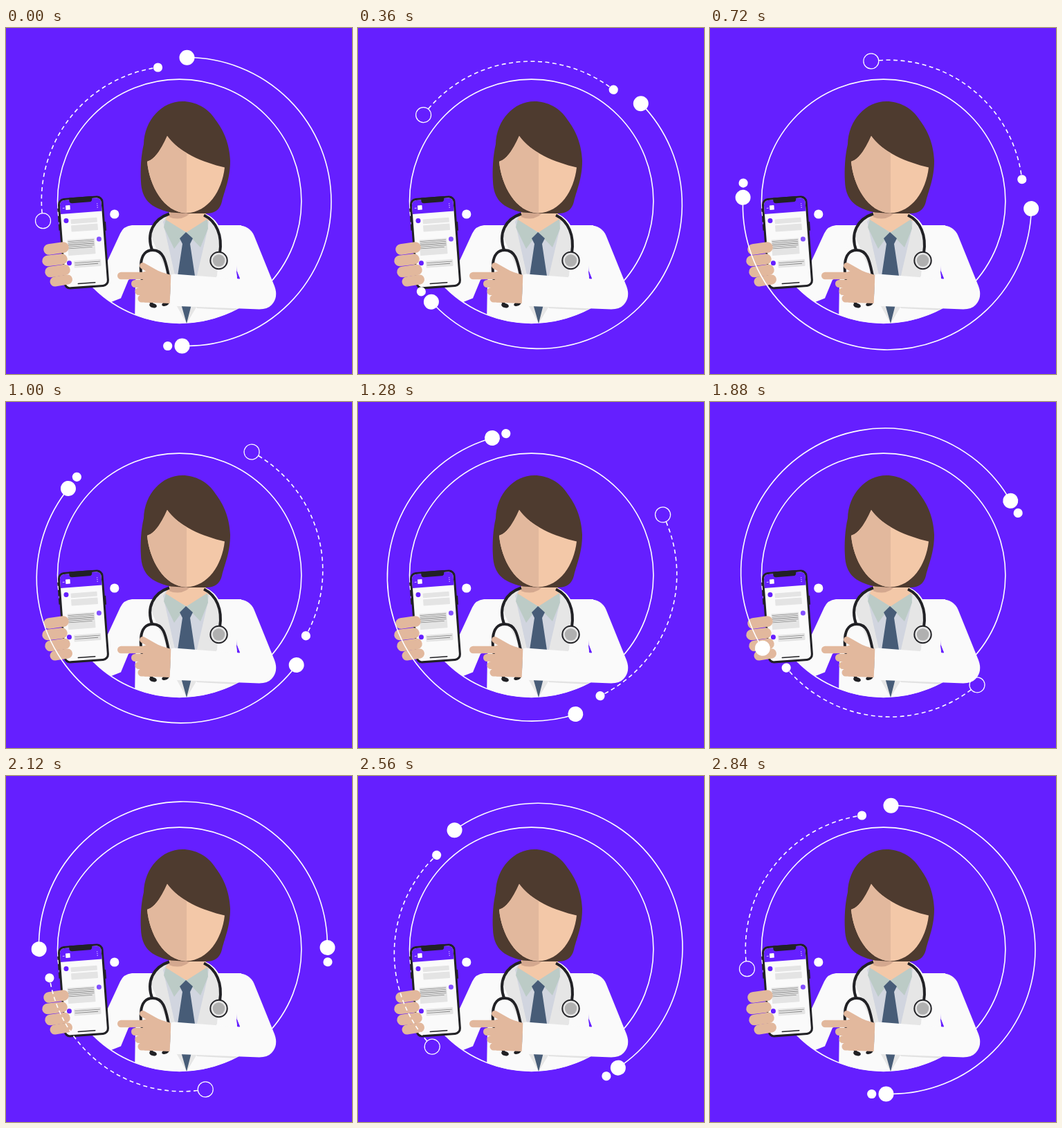
Recreate the animation shown at these times as an HTML page with a canvas. Size 500x500 px, loop 2880 ms.

```html
<!DOCTYPE html>
<html lang="en">
<head>
<meta charset="utf-8">
<title>Doctor with phone</title>
<style>
html, body { margin: 0; width: 100%; height: 100%; overflow: hidden; background: #651fff; }
canvas { display: block; width: 100vw; height: 100vh; }
</style>
</head>
<body>
<canvas id="stage"></canvas>
<script>
const SIZE = 500, STEP = 40, STEPS = 72;
const PIVOT = [256.05, 251];
const PURPLE = '#651fff', WHITE = '#fff', COAT = '#fafafa', LAPEL = '#e6e6e6',
  SHIRT = '#d1d5df', COLLAR = '#bccbc6', TIE = '#475c77', HAIR = '#4e3b2f',
  SKIN = '#e2b89d', LIGHT_SKIN = '#f3c8a8', NECK_SHADE = '#d4a88f', BLACK = '#212125';

const canvas = document.getElementById('stage');
const ctx = canvas.getContext('2d');
const dpr = window.devicePixelRatio || 1;
canvas.width = canvas.height = SIZE * dpr;
ctx.scale(dpr, dpr);

const rad = deg => deg * Math.PI / 180;

function fill(d, color) {
  ctx.fillStyle = color;
  ctx.fill(new Path2D(d));
}

function stroke(d, color, width) {
  ctx.strokeStyle = color;
  ctx.lineWidth = width;
  ctx.stroke(new Path2D(d));
}

function dot(x, y, r, color) {
  ctx.fillStyle = color;
  ctx.beginPath();
  ctx.arc(x, y, r, 0, 2 * Math.PI);
  ctx.fill();
}

function arc(x, y, r, from, to, width) {
  ctx.strokeStyle = WHITE;
  ctx.lineWidth = width;
  ctx.beginPath();
  ctx.arc(x, y, r, rad(from), rad(to));
  ctx.stroke();
}

function box(x, y, w, h, r, color) {
  ctx.fillStyle = color;
  ctx.beginPath();
  ctx.roundRect(x, y, w, h, r);
  ctx.fill();
}

function ellipse(x, y, rx, ry, turn, color) {
  ctx.fillStyle = color;
  ctx.beginPath();
  ctx.ellipse(x, y, rx, ry, rad(turn), 0, 2 * Math.PI);
  ctx.fill();
}

function drawBody() {
  ctx.save();
  ctx.beginPath();
  ctx.arc(250.7, 250.3, 176.6, 0, 2 * Math.PI);
  ctx.clip();
  // far sleeve, then torso
  fill('M208 285 H182 Q170 286 165 297 L146 338 L122 372 L128 396 H152 L166 390.5 L177 364 L200 350 Z', COAT);
  fill('M205 285 H213 C219 276 227 271 236 268 H287 C297 272 303 278 307 285 H340 L333 352 L338 380 V430 H186 L187 365 Z', COAT);
  // lapels and shirt
  fill('M236 268 C227 271 219 276 213 285 L209 300 L232 352 L247 402 L261 427 L276 402 L305 358 L309 305 L303 283 L287 269 Z', LAPEL);
  fill('M238 264 L227 280 L230 294 L248 375 L261 427 L272 375 L291 293 L293 280 L286 268 Z', SHIRT);
  fill('M274 401 L338 404 L335 408 L276 405 Z', '#e2e2e2');
  ctx.restore();

  fill('M238 262 H284 L295 277 L262 296 L230 278 Z', LIGHT_SKIN);
  fill('M238 263 H270 Q262 275 248 275.5 Q241 275.5 235.5 273 Z', NECK_SHADE);
  fill('M231 277 L260.5 295.5 L243 319 L228 288 Z', COLLAR);
  fill('M291 276 L260.5 295.5 L281 317 L292 290 Z', COLLAR);
  fill('M260 295 L270 304 L266 312 L274 365 L270 392 L261 427 L251 392 L247 365 L255 312 L251 304 Z', TIE);
}

function drawStethoscope() {
  ctx.lineCap = 'butt';
  stroke('M236 268.5 C213 276 202 297 211.5 322', BLACK, 4);
  stroke('M286 270.5 C304 279 313 300 309 325', BLACK, 4);
  stroke('M212 401 C200 380 193 360 195 341 C196 327 203 321 212 321 C229 321 231 340 235 358 C238 375 237 390 230 399', BLACK, 4);
  ellipse(212.5, 401, 5.5, 3.2, 15, BLACK);
  ellipse(230.5, 398.5, 5.5, 3, -22, BLACK);
  dot(307.5, 336, 13.2, BLACK);
  dot(307.5, 336, 11.2, '#e6e6e6');
  dot(307.5, 336, 8.7, '#b0b0b0');
}

function drawHead() {
  fill('M255 106 C225 106 200 133 199 168 C195 185 194 205 195 222 C196 247 208 260 238 266.5 L262 268 H290 C301 268 309 263 312 251 C316 234 324 218 324 192 C323 165 313 146 303 133 C292 115 273 106 255 106 Z', HAIR);
  const face = 'M233 156 C226 171 217 189 204 193 C207 227 228 267 261 267.5 C292 266 312 236 316 201.5 C284 194 250 180 233 156 Z';
  fill(face, LIGHT_SKIN);
  ctx.save();
  ctx.beginPath();
  ctx.rect(200, 150, 61, 120);
  ctx.clip();
  fill(face, SKIN);
  ctx.restore();
}

function drawPointingArm() {
  ctx.lineCap = 'round';
  stroke('M166.3 358 H200', SKIN, 10.6);
  stroke('M197.5 343.5 L216 354', SKIN, 9);
  stroke('M186.5 369.5 H205', SKIN, 11);
  stroke('M192 380.5 H205', SKIN, 11);
  stroke('M196 391 H208', SKIN, 11);
  fill('M197 353 L213 348 Q226 354 238.5 357 L237 398 L200 396.5 Z', SKIN);
  fill('M243 355.5 L334 362.5 L338 362 L333.5 351 L330 285 H335 Q352.5 286 358.5 300 L388 373 Q394 389 384 400 Q378 406.5 366 406.5 L236.5 401.5 L238.5 356.5 Z', COAT);
  fill('M333.5 351 L338 362.5 L334 362 Z', PURPLE);
}

function lines(x, y, w, gap, count) {
  for (let i = 0; i < count; i++) {
    box(x, y + i * gap, i === count - 1 ? w * 0.92 : w, 0.8, 0, '#858585');
  }
}

function drawPhone() {
  ctx.save();
  ctx.translate(74.3, 246.7);
  ctx.rotate(rad(-4.2));
  for (const [x, y, h] of [[-1.2, 14, 5], [-1.2, 25, 9], [-1.2, 37, 9], [65.2, 38, 13]]) {
    box(x, y, 2, h, 0.5, BLACK);
  }
  box(0, 0, 65.8, 131.7, 9, BLACK);
  box(3, 3, 59.8, 125.7, 6.5, '#fafafa');
  box(3, 3, 59.8, 19.5, [6.5, 6.5, 0, 0], PURPLE);
  box(16.8, 0, 33, 8, [0, 0, 4, 4], BLACK);

  box(6.5, 13.7, 3, 0.8, 0, WHITE);
  box(10.9, 10.6, 6.5, 6.5, 0.5, WHITE);
  for (const y of [11.3, 14, 16.7]) dot(56.8, y, 0.6, WHITE);

  const bubble = '#e4e4e4';
  dot(10.3, 32.7, 3.5, PURPLE);
  box(17, 31.2, 38, 6.7, 0.8, bubble);
  box(16.8, 40, 38.5, 9.3, 0.8, bubble);
  dot(55.7, 62.6, 3.5, '#8350ff');
  box(9.8, 60.4, 39.5, 23, 1, bubble);
  lines(10.7, 62.4, 37.5, 2.6, 5);
  dot(10.3, 94, 3.5, PURPLE);
  box(17.1, 91.5, 39, 10, 1, bubble);
  lines(18.2, 94.2, 36.5, 3, 2);
  box(20.2, 124, 26, 1.4, 0.7, BLACK);
  ctx.restore();

  ctx.lineCap = 'round';
  stroke('M62 320 L83 317', SKIN, 15.5);
  stroke('M60 336.5 L81 334', SKIN, 15.5);
  stroke('M64 352.5 L85 349.5', SKIN, 15.5);
  stroke('M70.5 366.5 L89 363.5', SKIN, 14);
}

function drawOrbits(turn) {
  ctx.save();
  ctx.translate(...PIVOT);
  ctx.rotate(turn);
  ctx.translate(-PIVOT[0], -PIVOT[1]);
  ctx.lineCap = 'butt';
  arc(261.5, 251, 208.5, -90, 91.9, 1.6);
  dot(261.5, 42.7, 11, WHITE);
  dot(254.5, 459.5, 11, WHITE);
  dot(233.7, 459.5, 6.6, WHITE);

  ctx.setLineDash([6, 4.5]);
  arc(245.5, 249.5, 194.2, 174.7, 262.3, 1.6);
  ctx.setLineDash([]);
  dot(219.5, 57, 6.6, WHITE);
  arc(53.5, 278.7, 11, 0, 360, 1.2);
  ctx.restore();
}

function draw(now) {
  const step = Math.floor(now / STEP) % STEPS;
  ctx.fillStyle = PURPLE;
  ctx.fillRect(0, 0, SIZE, SIZE);
  arc(250.7, 250.3, 176.2, 0, 360, 1.6);
  drawBody();
  drawStethoscope();
  drawHead();
  drawPointingArm();
  drawPhone();
  dot(156.8, 269, 6.6, WHITE);
  // the last step repeats the first pose
  drawOrbits(2 * Math.PI * step / (STEPS - 1));
  requestAnimationFrame(draw);
}

draw(0);
</script>
</body>
</html>
```
